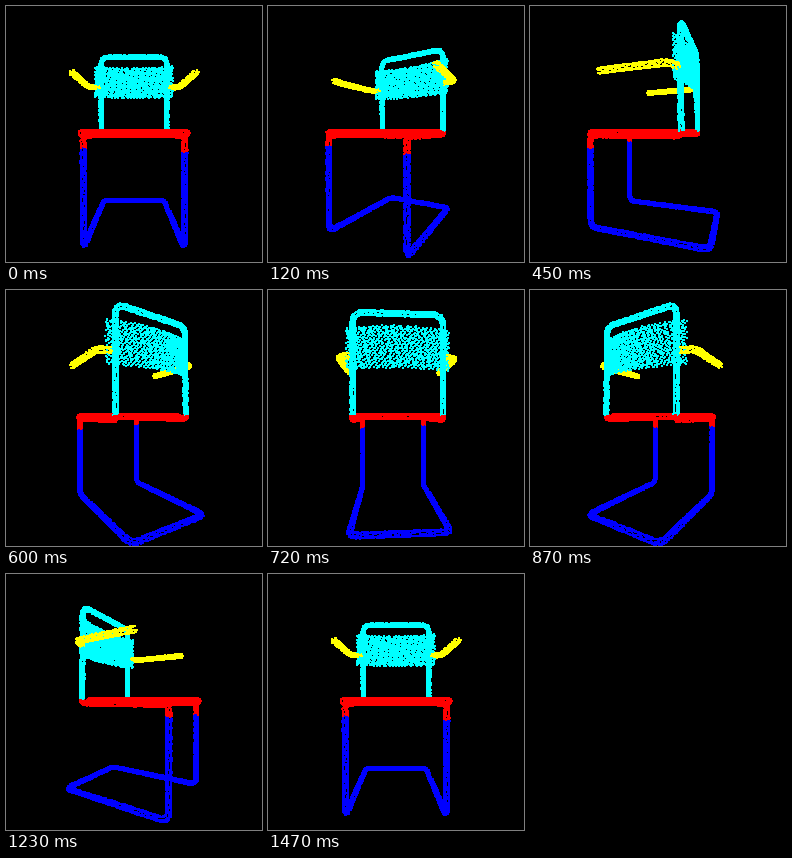
These frames come from a looping animation (256 by 256 pixels, 1500 ms). An HTML page with a canvas:

```html
<!DOCTYPE html>
<html lang="en">
<head>
<meta charset="utf-8">
<title>Rotating chair point cloud</title>
<style>
  html, body { margin: 0; width: 100%; height: 100%; overflow: hidden; background: #000; }
  canvas { display: block; width: 256px; height: 256px; }
</style>
</head>
<body>
<canvas id="stage" width="256" height="256"></canvas>
<script>
const ctx = document.getElementById('stage').getContext('2d');
const CENTER = 128, DISTANCE = 206, PITCH = 0.012;
const STEP = 30, STEPS = 50;
const DENSITY = 0.34;
const RED = '#f00', BLUE = '#00f', CYAN = '#0ff', YELLOW = '#ff0';

let seed = 7;
function rnd() {
  seed = (seed * 1664525 + 1013904223) >>> 0;
  return seed / 4294967296;
}

const points = [];
const add = (color, x, y, z) => points.push({ color, x, y, z, sx: 0, sy: 0, depth: 0 });
const mix = (a, b, t) => a.map((v, i) => v + (b[i] - v) * t);
const dist = (a, b) => Math.hypot(a[0] - b[0], a[1] - b[1], a[2] - b[2]);
const cross = (a, b) => [a[1] * b[2] - a[2] * b[1], a[2] * b[0] - a[0] * b[2], a[0] * b[1] - a[1] * b[0]];
const unit = v => v.map(c => c / Math.hypot(...v));
const mirror = path => path.map(([x, y, z]) => [-x, y, z]);

// Evenly spread pairs in the unit square, slightly jittered.
const evenPair = i => [
  (i * 0.7548776662 + rnd() * 0.012) % 1,
  (i * 0.5698402910 + rnd() * 0.012) % 1
];

// Replaces each inner corner of a polyline by a short quadratic curve.
function roundCorners(path, radius) {
  const out = [path[0]];
  for (let i = 1; i < path.length - 1; i++) {
    const p = path[i];
    const toward = q => mix(p, q, Math.min(0.5, radius / dist(p, q)));
    const a = toward(path[i - 1]), b = toward(path[i + 1]);
    for (let k = 0; k <= 6; k++) out.push(mix(mix(a, p, k / 6), mix(p, b, k / 6), k / 6));
  }
  out.push(path[path.length - 1]);
  return out;
}

function tube(color, path, thickness, bend) {
  const line = roundCorners(path, bend);
  let turn = 0;
  for (let i = 1; i < line.length; i++) {
    const a = line[i - 1], b = line[i], length = dist(a, b);
    if (length < 1e-6) continue;
    const dir = unit(b.map((v, k) => v - a[k]));
    const n = unit(cross(dir, Math.abs(dir[1]) > 0.8 ? [1, 0, 0] : [0, 1, 0]));
    const m = cross(dir, n);
    const count = Math.floor(length * thickness * 2 * Math.PI * DENSITY + rnd());
    for (let k = 0; k < count; k++) {
      turn += 2.39996 + rnd() * 0.3;
      const p = mix(a, b, (k + rnd()) / count);
      const c = Math.cos(turn) * thickness, s = Math.sin(turn) * thickness;
      add(color, ...p.map((v, j) => v + n[j] * c + m[j] * s));
    }
  }
}

function seat() {
  const put = (u, v, side) => {
    const rho = Math.min(1, Math.abs(u) ** 5 + Math.abs(v) ** 5);
    const bottom = -1 - v;
    const mid = (3.8 + bottom) / 2, half = (3.8 - bottom) / 2;
    add(RED, u * (43.5 + 2 * v), mid + side * half * Math.sqrt(1 - rho ** 6), 12.5 + 47 * v);
  };
  for (let i = 0; i < 6400; i++) {
    const [u, v] = evenPair(i).map(t => t * 2 - 1);
    if (Math.abs(u) ** 5 + Math.abs(v) ** 5 < 1) put(u, v, i % 2 ? 1 : -1);
  }
  for (let i = 0; i < 900; i++) {
    const t = rnd() * 2 * Math.PI, c = Math.cos(t), s = Math.sin(t);
    const k = (0.92 + 0.08 * rnd()) / (Math.abs(c) ** 5 + Math.abs(s) ** 5) ** 0.2;
    put(c * k, s * k, i % 2 ? 1 : -1);
  }
}

function backPanel() {
  const width = 89, height = 35;
  for (let i = 0; i < width * height * DENSITY; i++) {
    const [a, b] = evenPair(i);
    const u = a * 2 - 1;
    add(CYAN, width / 2 * u, 41.5 + height * b, -36 + 8 * u * u);
  }
}

function buildChair() {
  const left = -38, right = 38, front = 52, rear = -55, floor = -85;
  tube(BLUE, [[left, -10, front], [left, floor, front], [left, floor, rear],
    [right, floor, rear], [right, floor, front], [right, -13, front]], 2, 7);
  tube(CYAN, [[-38, 3, -33], [-38, 88, -32], [38, 88, -32], [38, 3, -33]], 2, 9);
  const rail = low => [[right, low, front], [right, -1, front], [38, -1, -33], [38, 3, -33]];
  tube(RED, rail(-13), 2, 5);
  tube(RED, mirror(rail(-10)), 2, 5);
  const arm = [[40, 52.5, -31], [51, 52.5, -26], [52, 52, 33]];
  tube(YELLOW, arm, 2.4, 5);
  tube(YELLOW, mirror(arm), 2.4, 5);
  seat();
  backPanel();
}

function draw(angle) {
  const c = Math.cos(angle), s = Math.sin(angle);
  for (const p of points) {
    const z = p.x * s + p.z * c;
    p.depth = z + p.y * PITCH;
    const scale = DISTANCE / (DISTANCE - p.depth);
    p.sx = Math.round(CENTER + (p.x * c - p.z * s) * scale) - 1;
    p.sy = Math.round(CENTER - (p.y - z * PITCH) * scale) - 1;
  }
  points.sort((a, b) => a.depth - b.depth);
  ctx.fillStyle = '#000';
  ctx.fillRect(0, 0, 256, 256);
  for (const p of points) {
    ctx.fillStyle = p.color;
    ctx.fillRect(p.sx, p.sy, 2, 2);
  }
}

let shown = -1;
function tick() {
  const step = Math.floor(performance.now() / STEP) % STEPS;
  if (step !== shown) {
    shown = step;
    draw(step / (STEPS - 1) * 2 * Math.PI);
  }
  requestAnimationFrame(tick);
}

buildChair();
tick();
</script>
</body>
</html>
```
